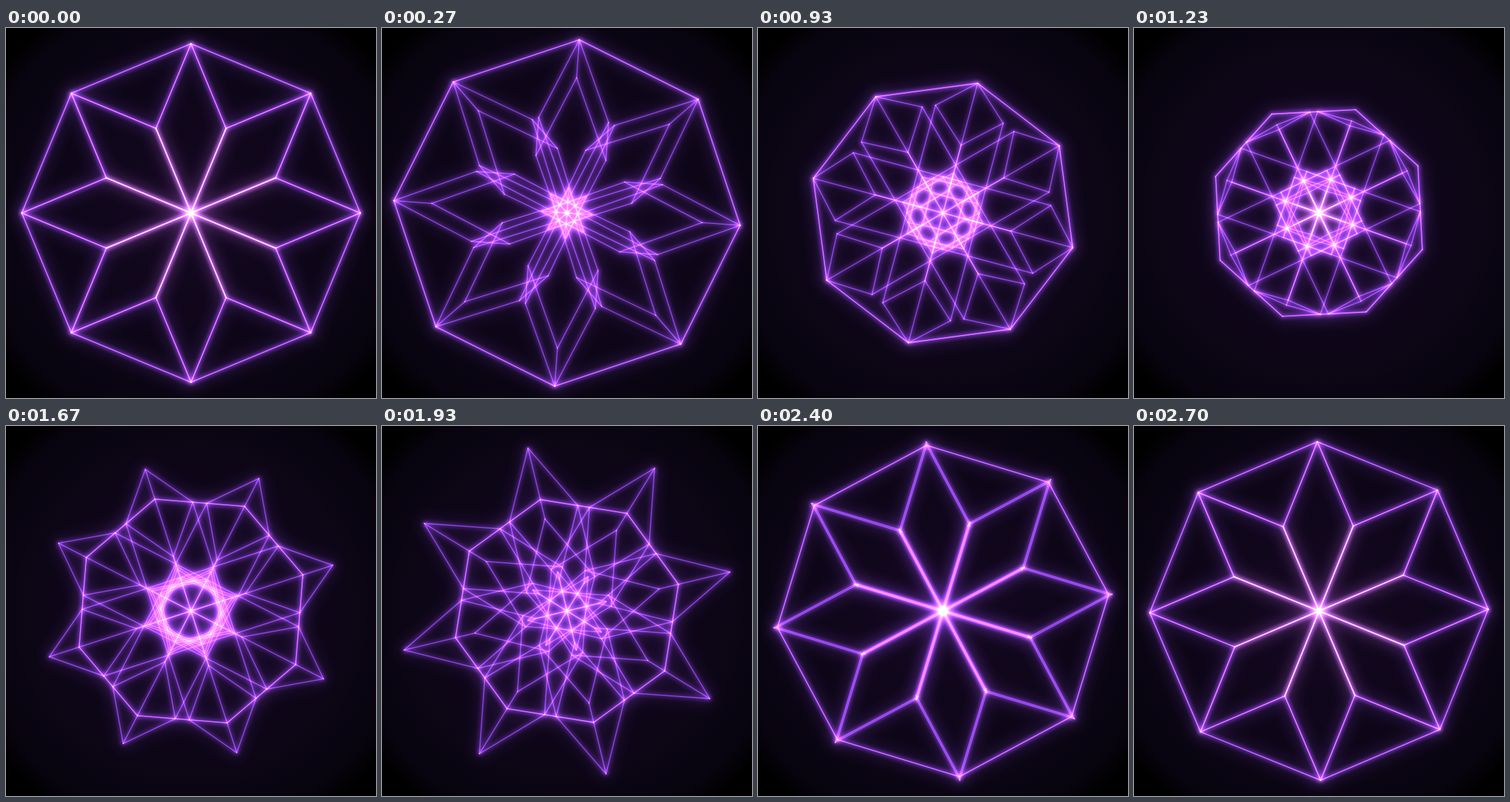
Write an HTML page with a canvas that moves like this. It is 540 px wide and 540 px high and loops after 2730 ms.

```html
<!DOCTYPE html>
<html lang="en">
<head>
<meta charset="utf-8">
<title>Turning octagonal star</title>
<style>
  html, body { margin: 0; width: 100%; height: 100%; overflow: hidden; background: #000; }
  canvas { display: block; width: 540px; height: 540px; }
</style>
</head>
<body>
<canvas id="stage" width="540" height="540"></canvas>
<script>
const SIZE = 540, MID = SIZE / 2, LOOP = 2730, STEPS = 82;
const SIDES = 8, SECTOR = 2 * Math.PI / SIDES;

// Rhombic prism: half length (radial), half width (tangential), half depth.
const HALF_LEN = 123.5;
const HALF_WIDTH = HALF_LEN * Math.tan(SECTOR / 2);
const HALF_DEPTH = 88;
const FLIP_STEPS = 72.4;

// Uneven pacing of the steps: [step, progress].
const PACE = [[0, 0], [8, 7.4], [20, 19.9], [37, 35.5], [50, 49.4], [65, 64.5], [82, 82]];

const ctx = document.getElementById('stage').getContext('2d');
const wire = document.createElement('canvas');
wire.width = wire.height = SIZE;
const pen = wire.getContext('2d');

const backdrop = ctx.createRadialGradient(MID, MID, 0, MID, MID, 350);
backdrop.addColorStop(0, '#150823');
backdrop.addColorStop(0.6, '#0d0617');
backdrop.addColorStop(0.9, '#08040f');
backdrop.addColorStop(1, '#000');

function paced(step) {
  const i = PACE.findIndex(([s]) => s > step);
  const [s0, p0] = PACE[i - 1], [s1, p1] = PACE[i];
  return p0 + (p1 - p0) * (step - s0) / (s1 - s0);
}

// u runs outward along the arm, v across it.
function line([u0, v0], [u1, v1], alpha) {
  pen.strokeStyle = `rgba(160, 76, 255, ${alpha})`;
  pen.beginPath();
  pen.moveTo(v0, -u0);
  pen.lineTo(v1, -u1);
  pen.stroke();
}

function drawArm(center, flip) {
  const len = HALF_LEN * Math.cos(flip), depth = HALF_DEPTH * Math.sin(flip);
  const face = shift => [
    [center + len + shift, 0], [center + shift, HALF_WIDTH],
    [center - len + shift, 0], [center + shift, -HALF_WIDTH]
  ];
  const front = face(depth), back = face(-depth);
  front.forEach((p, i) => {
    const next = (i + 1) % 4;
    line(p, front[next], 0.5);
    line(back[i], back[next], 0.5);
    line(p, back[i], 0.5);
  });
}

function rimRadius(center, flip) {
  const len = HALF_LEN * Math.cos(flip), depth = HALF_DEPTH * Math.sin(flip);
  const tip = center + Math.sign(len) * (len + depth);
  const shoulder = center + depth + HALF_WIDTH * Math.tan(SECTOR / 2);
  return Math.max(tip, shoulder);
}

function drawWire(progress) {
  const turn = progress / STEPS * SECTOR;
  const phase = Math.min(1, progress / FLIP_STEPS);
  const flip = phase * Math.PI;
  const center = HALF_LEN * (0.4 + 0.6 * Math.abs(1 - 2 * phase));
  const rim = rimRadius(center, flip);
  const rimEnd = [rim * Math.cos(SECTOR), rim * Math.sin(SECTOR)];

  pen.setTransform(1, 0, 0, 1, 0, 0);
  pen.clearRect(0, 0, SIZE, SIZE);
  pen.globalCompositeOperation = 'lighter';
  pen.lineWidth = 1.6;
  pen.lineCap = 'round';
  pen.translate(MID, MID);
  pen.rotate(turn);
  for (let k = 0; k < SIDES; k++) {
    drawArm(center, flip);
    line([rim, 0], rimEnd, 0.85);
    pen.rotate(SECTOR);
  }
}

function addLayer(blur, times) {
  ctx.filter = blur ? `blur(${blur}px)` : 'none';
  for (let i = 0; i < times; i++) ctx.drawImage(wire, 0, 0);
}

function render(time) {
  const step = Math.min(STEPS - 1, Math.floor((time % LOOP + 4) * 0.03));
  drawWire(paced(step));
  ctx.globalCompositeOperation = 'source-over';
  ctx.filter = 'none';
  ctx.fillStyle = backdrop;
  ctx.fillRect(0, 0, SIZE, SIZE);
  ctx.globalCompositeOperation = 'lighter';
  addLayer(11, 2);
  addLayer(3, 2);
  addLayer(0, 1);
}

const start = performance.now();
function tick() {
  render(performance.now() - start);
  requestAnimationFrame(tick);
}
tick();
</script>
</body>
</html>
```
